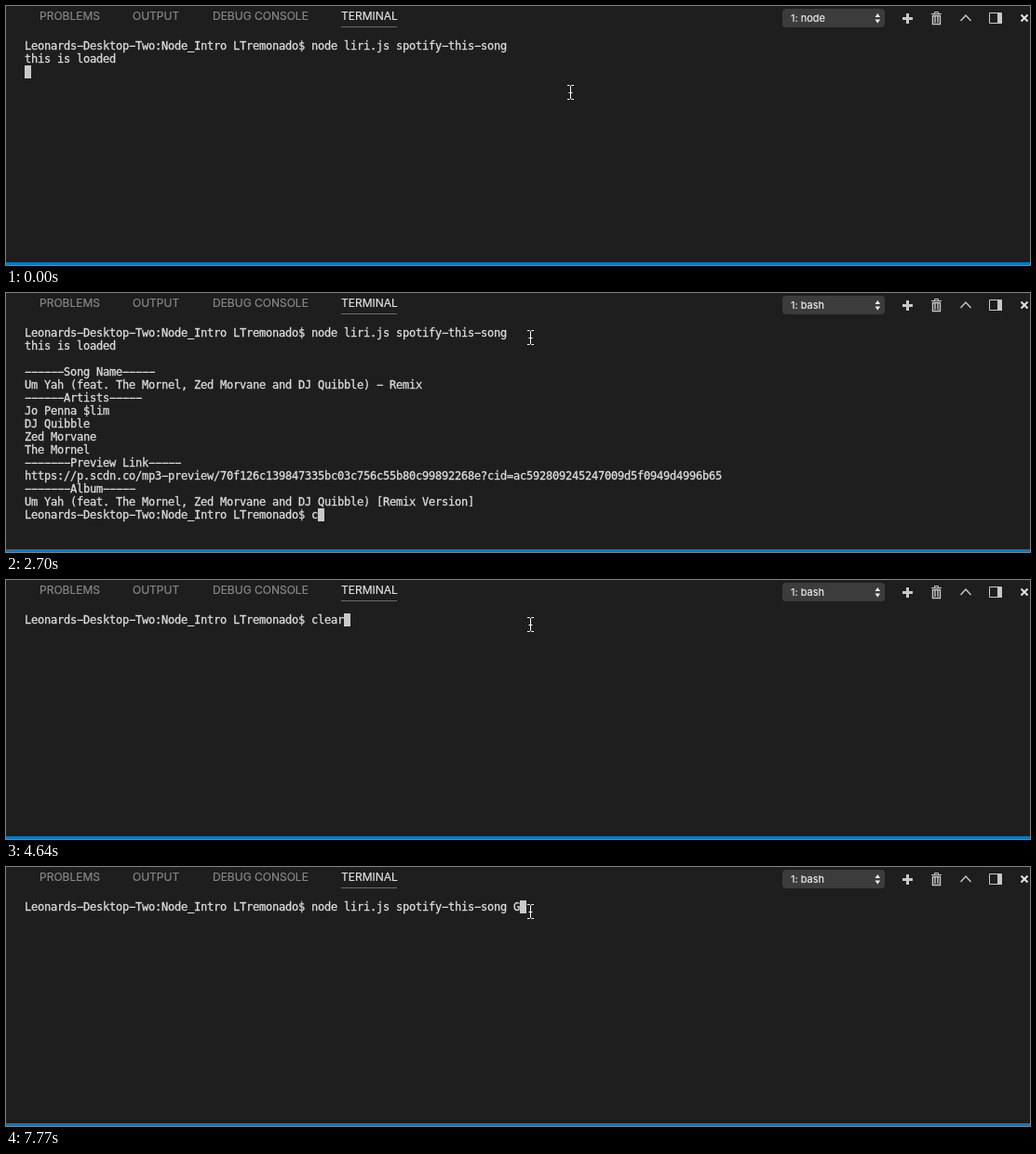
An HTML page that plays this animation: 1100x279 px, repeating every 8 s.

```html
<!DOCTYPE html>
<html lang="en">
<head>
<meta charset="utf-8">
<title>Terminal</title>
<style>
html, body { margin: 0; width: 100%; height: 100%; overflow: hidden; background: #1e1e1e; }
svg { position: absolute; left: 0; top: 0; }
svg text { font: 12px Inter, sans-serif; fill: #8a8a8a; stroke: #8a8a8a; stroke-width: .15px; }
svg .active { fill: #e7e7e7; stroke: #e7e7e7; }
svg .small { font-size: 11px; fill: #f0f0f0; stroke: #f0f0f0; }
pre {
  position: absolute; left: 20px; top: 36px; margin: 0; color: #dcdcdc;
  font: 12px/14px "DejaVu Sans Mono", monospace;
  letter-spacing: calc(7px - 1ch); /* 7px cells */
  -webkit-text-stroke: .3px #dcdcdc;
}
#caret { position: absolute; width: 7px; height: 14px; background: #cacaca; }
</style>
</head>
<body>
<pre id="screen"></pre>
<div id="caret"></div>
<svg width="1100" height="279" fill="none">
  <text x="36" y="15">PROBLEMS</text>
  <text x="136" y="15">OUTPUT</text>
  <text x="222" y="15">DEBUG CONSOLE</text>
  <text x="360" y="15" class="active">TERMINAL</text>
  <path d="M360 22.5h60" stroke="#6c6c6c"/>
  <rect x="834" y="3" width="110" height="20" rx="4" fill="#3c3c3c"/>
  <text id="shell" x="843" y="17" class="small"></text>
  <path d="M933.5 12l2.8-4 2.8 4zM933.5 14.5l2.8 4 2.8-4z" fill="#eee"/>
  <g stroke="#c8c8c8">
    <path d="M963 13.5h11M968.5 8v11" stroke-width="3"/>
    <path d="M994 8.5h11M997.5 8v-1.5h4v1.5"/>
    <path d="M995.5 10.5h8v9h-8zM998 11v7M1001 11v7" stroke-width="1.4"/>
    <path d="M1025.500 16l5.500-6 5.500 6" stroke-width="1.4"/>
    <path d="M1056.500 7.500h13v11h-13z"/>
    <path d="M1065 8h5v11h-5z" fill="#c8c8c8" stroke="none"/>
    <path d="M1090.500 9.500l7 7m0-7l-7 7" stroke="#e4e4e4" stroke-width="2"/>
  </g>
  <rect y="276" width="1100" height="3" fill="#007acc"/>
  <path id="mouse" d="M-3.500-7.500h2.500l1 1 1-1h2.500M-3.500 7.500h2.500l1-1 1 1h2.500M0-6.500v13M-2 .5h4" stroke="#fff"/>
</svg>
<script>
const LOOP = 8000;
const prompt = "Leonards-Desktop-Two:Node_Intro LTremonado$ ";
const command = "node liri.js spotify-this-song";
const song = "Um Yah (feat. The Mornel, Zed Morvane and DJ Quibble)";
const loading = prompt + command + "\nthis is loaded\n";
const result = loading + `
------Song Name-----
${song} - Remix
------Artists-----
Jo Penna $lim
DJ Quibble
Zed Morvane
The Mornel
-------Preview Link-----
https://p.scdn.co/mp3-preview/70f126c139847335bc03c756c55b80c99892268e?cid=ac592809245247009d5f0949d4996b65
-------Album-----
${song} [Remix Version]
${prompt}`;

// [start time, terminal contents]
const screens = [
  [0, loading], [150, result],
  [2700, result + "c"], [2850, result + "cle"], [3000, result + "clea"], [3150, result + "clear"],
  [3440, prompt],
  [4640, prompt + "clear"], [4790, prompt + command],
  [5240, prompt + command.slice(0, -1)], [5680, prompt + command.slice(0, -3)],
  [6730, prompt + command.slice(0, -2)], [6880, prompt + command.slice(0, -1)],
  [7020, prompt + command + " "], [7770, prompt + command + " G"]
];
const pointer = [[0, [606.5, 93]], [1200, [590.5, 58]], [1350, [563.5, 48]]];

const $ = id => document.getElementById(id);
const at = (steps, t) => steps.findLast(([start]) => start <= t)[1];
let shown;

function draw(t) {
  const text = at(screens, t);
  if (text !== shown) {
    shown = text;
    const lines = text.split("\n");
    // the terminal face has wide hyphens, like this font's minus sign
    $("screen").textContent = text.replaceAll("-", "\u2212");
    $("caret").style.left = 20 + 7 * lines.at(-1).length + "px";
    $("caret").style.top = 22 + 14 * lines.length + "px";
    $("shell").textContent = text === loading ? "1: node" : "1: bash";
  }
  $("mouse").setAttribute("transform", `translate(${at(pointer, t)})`);
}

const begin = performance.now();
function frame() {
  draw((performance.now() - begin) % LOOP);
  requestAnimationFrame(frame);
}
frame();
</script>
</body>
</html>
```
